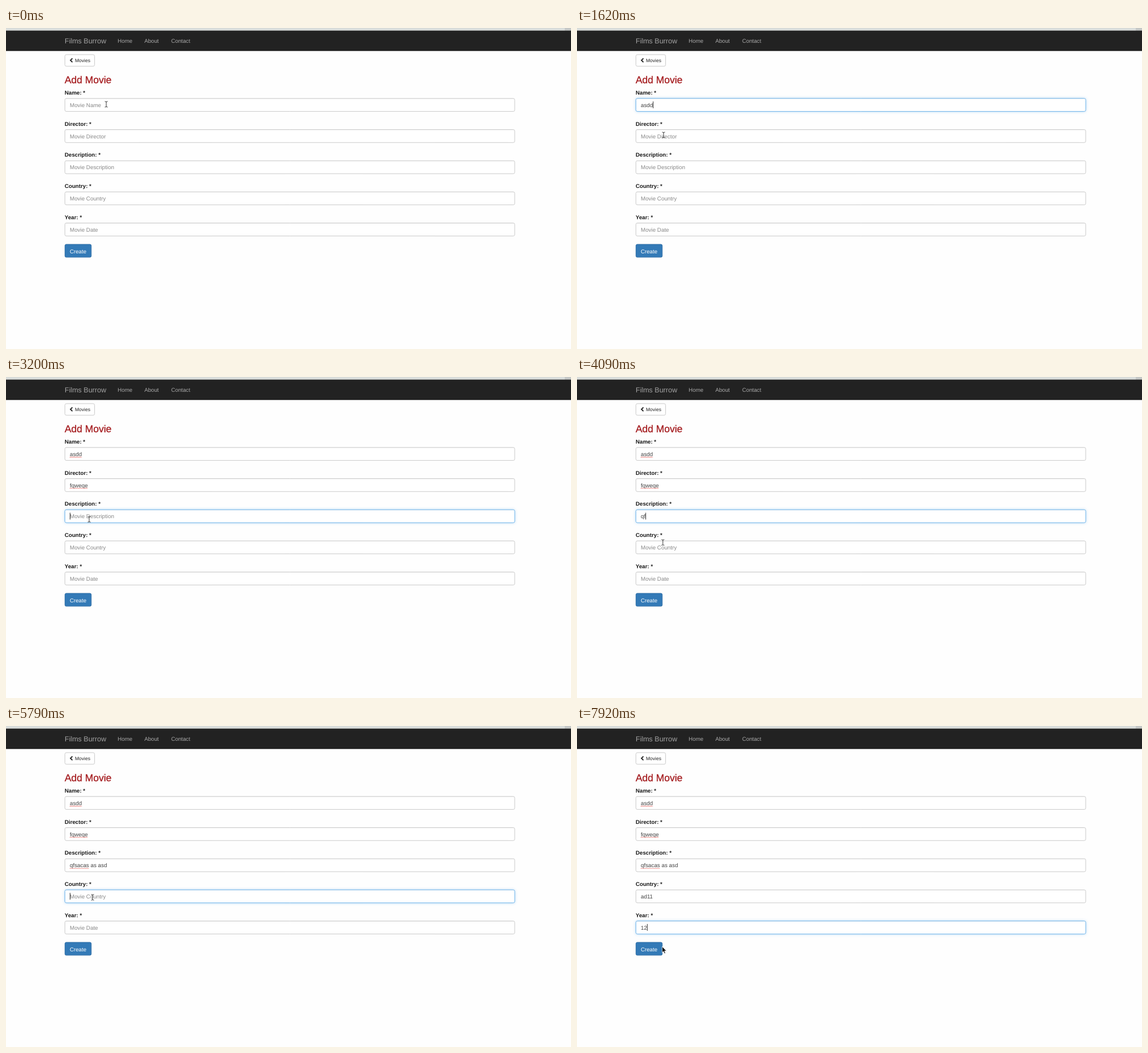
An HTML page with a canvas for the animation above (8 s loop, 992x564 px).

```html
<!DOCTYPE html>
<html lang="en">
<head>
<meta charset="utf-8">
<title>Add Movie</title>
<style>
html, body { margin: 0; width: 100%; height: 100%; overflow: hidden; background: #fefefe; }
canvas { display: block; }
</style>
</head>
<body>
<canvas id="stage" width="992" height="564"></canvas>
<script>
const LOOP = 8000, STEP = 152.3, BLINK = 550;
const LEFT = 103, PAD = 112, WIDTH = 790.6, ROW = 54.72, HEIGHT = 23.7;
const FAMILY = 'px "Liberation Sans", Arial, sans-serif';
const ctx = document.getElementById('stage').getContext('2d');
ctx.textRendering = 'geometricPrecision';

// '|' separates keystrokes, the first at `start`, the others `gap` ms apart.
const fields = [
  { name: 'Name', keys: 'a|s|d|d', focus: 410, start: 870, gap: 150 },
  { name: 'Director', keys: 'f|q|w|e|q|e', focus: 1770, start: 1920, gap: 195 },
  { name: 'Description', keys: 'q|f|s|a|c|a|s| |as| as|d', focus: 3040, start: 3640, gap: 170 },
  { name: 'Country', keys: 'a|d|1|1', focus: 5490, start: 5800, gap: 165 },
  { name: 'Year', hint: 'Date', keys: '1|2', focus: 7190, start: 7480, gap: 150 }
];
fields.forEach((f, i) => {
  f.y = 123.3 + ROW * i;
  f.keys = f.keys.split('|');
});

const home = { x: 176, y: 134 };
const moves = [
  { from: 410, to: 870, x: 143, y: 291 },
  { from: 1020, to: 1470, x: 152, y: 188 },
  { from: 2440, to: 2580, x: 165.5, y: 215.5 },
  { from: 2600, to: 2900, x: 146, y: 250 },
  { from: 3640, to: 4090, x: 152, y: 301 },
  { from: 6300, to: 6740, x: 153, y: 356 },
  { from: 7630, to: 7915, x: 149.5, y: 387.5 }
];
const beam = new Path2D('M-2.5-5Q0-5 0-3.8Q0-5 2.5-5M0-4V4M-2.5 5Q0 5 0 3.8Q0 5 2.5 5');
const arrow = new Path2D('M0 0V10.6L2.4 8.4L4 12.2L5.8 11.4L4.2 7.7H7.5Z');

function rect(x, y, w, h, color) {
  ctx.fillStyle = color;
  ctx.fillRect(x, y, w, h);
}

function box(x, y, w, h, fill, border, glow) {
  ctx.beginPath();
  ctx.roundRect(x + .45, y + .45, w - .9, h - .9, 2.5);
  ctx.save();
  if (glow) {
    ctx.shadowColor = glow;
    ctx.shadowBlur = 5.5;
  }
  ctx.fillStyle = fill;
  ctx.fill();
  ctx.restore();
  ctx.strokeStyle = border;
  ctx.lineWidth = .9;
  ctx.stroke();
}

function text(str, x, y, size, color, weight = '') {
  ctx.font = `${weight} ${size}${FAMILY}`;
  ctx.fillStyle = color;
  ctx.fillText(str, x, y);
}

function drawPage() {
  rect(0, 0, 992, 564, '#fefefe');
  rect(0, 0, 992, 5, '#d8dcda');
  rect(981, 0, 11, 5, '#c4c7c6');
  rect(0, 4.6, 992, 35.6, '#222');
  rect(0, 39.5, 992, .7, '#0c0c0c');
  text('Films Burrow', LEFT, 26.6, 12.5, '#a2a2a2');
  text('Home', 196, 26, 9.7, '#a8a8a8');
  text('About', 243, 26, 9.7, '#a8a8a8');
  text('Contact', 290, 26, 9.7, '#a8a8a8');

  box(LEFT, 46.4, 53, 21.2, '#fff', '#c4c4c4');
  text('Movies', 121, 60, 8.5, '#222');
  ctx.strokeStyle = '#222';
  ctx.lineWidth = 1.9;
  ctx.stroke(new Path2D('M116.6 53.3L113.2 56.7L116.6 60.1'));

  text('Add Movie', LEFT, 96.8, 17.4, '#a51d20');
  ctx.strokeStyle = '#a51d20';
  ctx.lineWidth = .35;
  ctx.strokeText('Add Movie', LEFT, 96.8);

  box(LEFT, 379.6, 47.2, 23.7, '#337ab7', '#2e6da4');
  text('Create', PAD, 395.6, 9.7, '#fff');
}

function drawField(f, active, t) {
  const count = Math.max(0, Math.min(f.keys.length, 1 + Math.floor((t - f.start) / f.gap)));
  const typed = f.keys.slice(0, count).join('');
  const base = f.y + 15.7;

  text(f.name + ': *', LEFT, f.y - 6.5, 9.7, '#1a1a1a', 'bold');
  if (active) box(LEFT, f.y, WIDTH, HEIGHT, '#fff', '#66afe9', 'rgba(102,175,233,.6)');
  else box(LEFT, f.y, WIDTH, HEIGHT, '#fff', '#c4c4c4');
  rect(LEFT + 2, f.y + .9, WIDTH - 4, .7, 'rgba(0,0,0,.05)');
  text(typed || 'Movie ' + (f.hint || f.name), PAD, base, 9.8, typed ? '#444' : '#888');

  // A long first word is marked as misspelt once it is finished.
  const word = typed.match(/^[a-z]{4,}/);
  if (word && (!active || typed.includes(' '))) {
    ctx.strokeStyle = '#e0433c';
    ctx.lineWidth = 1.2;
    ctx.setLineDash([1.2, .9]);
    ctx.beginPath();
    ctx.moveTo(PAD, base + 1.8);
    ctx.lineTo(PAD + ctx.measureText(word[0]).width, base + 1.8);
    ctx.stroke();
    ctx.setLineDash([]);
  }

  const last = count ? f.start + (count - 1) * f.gap : f.focus;
  if (active && Math.floor((t - last) / BLINK) % 2 === 0) {
    rect(PAD + ctx.measureText(typed).width, base - 10, 1, 12, '#333');
  }
}

function drawPointer(t) {
  let { x, y } = home;
  for (const m of moves) {
    const p = Math.max(0, Math.min(1, (t - m.from) / (m.to - m.from)));
    const ease = p * p * (3 - 2 * p);
    x += (m.x - x) * ease;
    y += (m.y - y) * ease;
  }
  ctx.save();
  ctx.translate(x, y);
  if (fields.some(f => y >= f.y && y <= f.y + HEIGHT)) {
    ctx.strokeStyle = '#222';
    ctx.lineWidth = .9;
    ctx.stroke(beam);
  } else {
    ctx.fillStyle = '#111';
    ctx.strokeStyle = '#fff';
    ctx.lineWidth = .7;
    ctx.fill(arrow);
    ctx.stroke(arrow);
  }
  ctx.restore();
}

function draw(time) {
  // The screen refreshes in steps rather than smoothly.
  const t = Math.floor((time + 10) / STEP) * STEP;
  const active = fields.filter(f => f.focus <= t).pop();
  drawPage();
  fields.forEach(f => drawField(f, f === active, t));
  drawPointer(t);
}

const begin = performance.now();
function tick() {
  draw((performance.now() - begin) % LOOP);
  requestAnimationFrame(tick);
}
tick();
</script>
</body>
</html>
```
